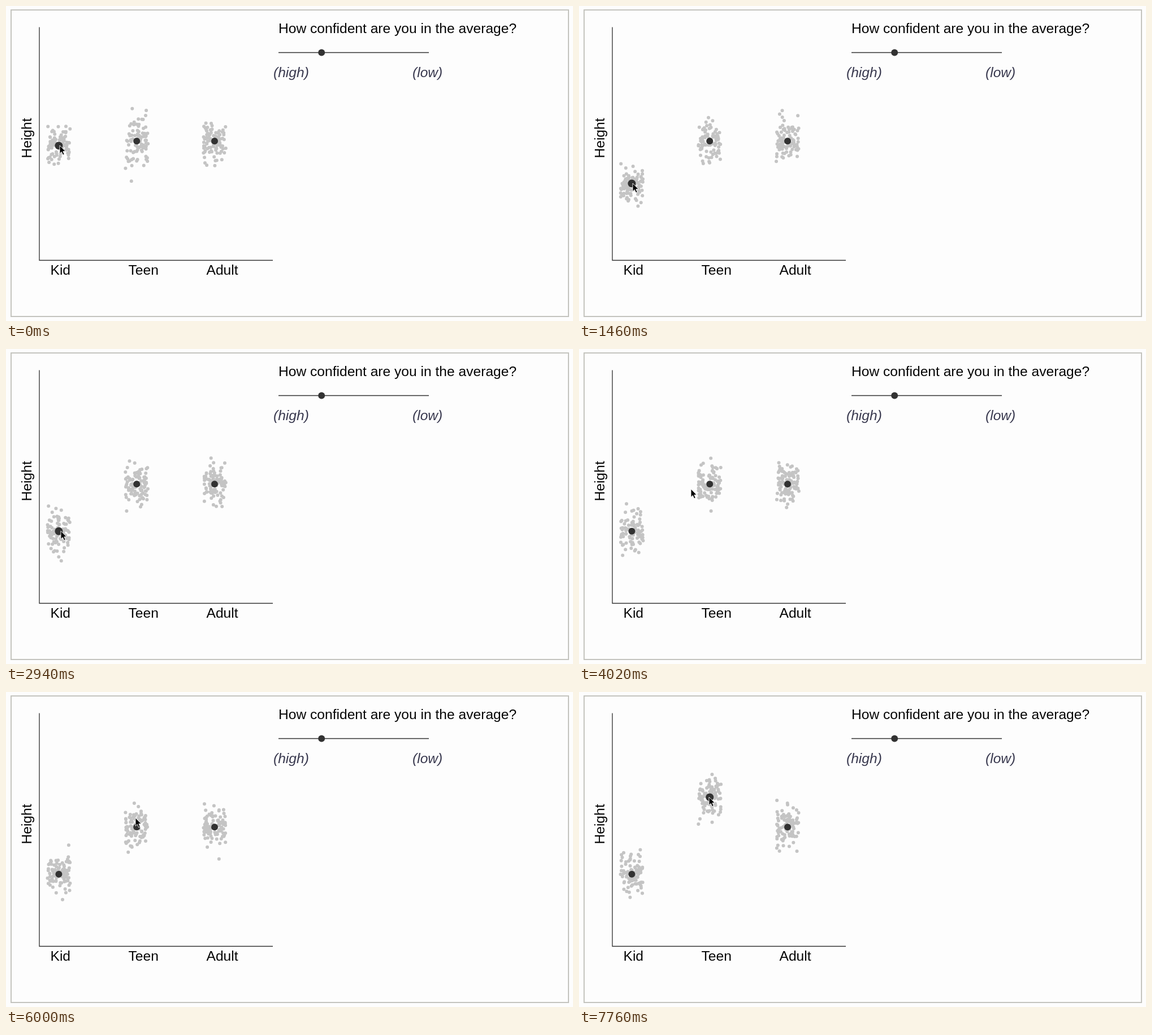
An HTML page that plays this animation: 1003 px wide and 558 px high, repeating every 7780 ms.

```html
<!DOCTYPE html>
<html lang="en">
<head>
<meta charset="utf-8">
<title>Confidence in the average</title>
<style>
  html, body { margin: 0; width: 100%; height: 100%; overflow: hidden; background: #fdfdfd; }
  svg { display: block; }
  text { font: 24.6px "Liberation Sans", Arial, sans-serif; fill: #050505; }
  .hint { font-style: italic; fill: #39394f; }
  .line { fill: none; stroke: #333; stroke-width: 1.35; }
  .cloud { fill: none; stroke: #c4c4c4; stroke-width: 6; stroke-linecap: round; }
  .dot { fill: #323232; }
</style>
</head>
<body>
<svg width="1003" height="558" viewBox="0 0 1003 558">
  <rect x="9" y="7" width="986" height="543" fill="none" stroke="#c4c4be" stroke-width="2"/>
  <path class="line" d="M59 37.5V450.5H472M482 82.5H748"/>
  <circle class="dot" cx="558.2" cy="82.6" r="6"/>
  <text x="482" y="47.5">How confident are you in the average?</text>
  <text class="hint" x="473" y="126">(high)</text>
  <text class="hint" x="719" y="126">(low)</text>
  <text transform="translate(45 234) rotate(-90)" text-anchor="middle">Height</text>
  <text x="78.5" y="475.5">Kid</text>
  <text x="216.5" y="475.5">Teen</text>
  <text x="354.5" y="475.5">Adult</text>
  <g id="plot"></g>
  <path id="cursor" d="M0 0V14.4L3.3 11.4L5.7 16.8L8.2 15.8L5.9 10.5H10.2Z" fill="#000" stroke="#fff" stroke-width=".9"/>
</svg>
<script>
const LOOP = 7780, STEP = 20;
const COUNT = 95, HALF_WIDTH = 20, SPREAD = 17.5, REST = 239.3;
const RELEASE = 3200, GRAB = 6480;

// time, x, y of the pointer
const track = [
  [0, 95, 247], [700, 95, 284], [1460, 95, 314], [2200, 96.5, 321.5],
  [2940, 97, 322.3], [3250, 97, 322.3], [3600, 128, 300], [4020, 198, 248],
  [4400, 232, 227], [4760, 236, 225], [6000, 229, 223], [GRAB, 230, REST],
  [7100, 230, 208], [7760, 230, 186]
];

// monotone cubic through column k of the track
function sample(k, t) {
  const last = track.length - 2;
  const slope = i => {
    const j = Math.max(0, Math.min(last, i));
    return (track[j + 1][k] - track[j][k]) / (track[j + 1][0] - track[j][0]);
  };
  const tangent = i => {
    const a = slope(i - 1), b = slope(i);
    return a * b > 0 ? 2 * a * b / (a + b) : 0;
  };
  let i = 0;
  while (i < last && t >= track[i + 1][0]) i++;
  const p = track[i], q = track[i + 1], h = q[0] - p[0];
  const u = Math.min(1, (t - p[0]) / h), v = 1 - u;
  return v * v * (1 + 2 * u) * p[k] + u * u * (3 - 2 * u) * q[k]
    + u * v * h * (v * tangent(i) - u * tangent(i + 1));
}

function random(seed) {
  return () => {
    seed = seed + 0x6D2B79F5 | 0;
    let r = Math.imul(seed ^ seed >>> 15, 1 | seed);
    r = r + Math.imul(r ^ r >>> 7, 61 | r) ^ r;
    return ((r ^ r >>> 14) >>> 0) / 4294967296;
  };
}

function cloud(cx, cy, rnd) {
  let d = "";
  for (let i = 0; i < COUNT; i++) {
    const x = cx + (rnd() * 2 - 1) * HALF_WIDTH;
    const z = Math.sqrt(-2 * Math.log(1 - rnd())) * Math.cos(2 * Math.PI * rnd());
    d += `M${x.toFixed(1)} ${(cy + z * SPREAD).toFixed(1)}h.01`;
  }
  return d;
}

const plot = document.getElementById("plot");
const cursor = document.getElementById("cursor");

function add(tag, cls) {
  const el = document.createElementNS("http://www.w3.org/2000/svg", tag);
  el.setAttribute("class", cls);
  return plot.appendChild(el);
}

const groups = [93.4, 231.2, 369].map(x => ({ x, dots: add("path", "cloud"), mean: add("circle", "dot") }));

function draw(step) {
  const t = step * STEP, px = sample(1, t), py = sample(2, t);
  const heights = [
    sample(2, Math.min(t, RELEASE)) + .4,
    t > GRAB ? py + .4 : REST,
    REST
  ];
  const rnd = random(step * 7919 + 17);
  groups.forEach(({ x, dots, mean }, i) => {
    const y = heights[i];
    dots.setAttribute("d", cloud(x, y, rnd));
    mean.setAttribute("cx", x);
    mean.setAttribute("cy", y);
    mean.setAttribute("r", Math.hypot(px - x, py - y) < 7 ? 7 : 6);
  });
  cursor.setAttribute("transform", `translate(${px} ${py})`);
}

let start, shown = 0;
function tick(now) {
  start ??= now;
  const step = Math.floor((now - start) % LOOP / STEP);
  if (step !== shown) draw(shown = step);
  requestAnimationFrame(tick);
}
draw(0);
requestAnimationFrame(tick);
</script>
</body>
</html>
```
